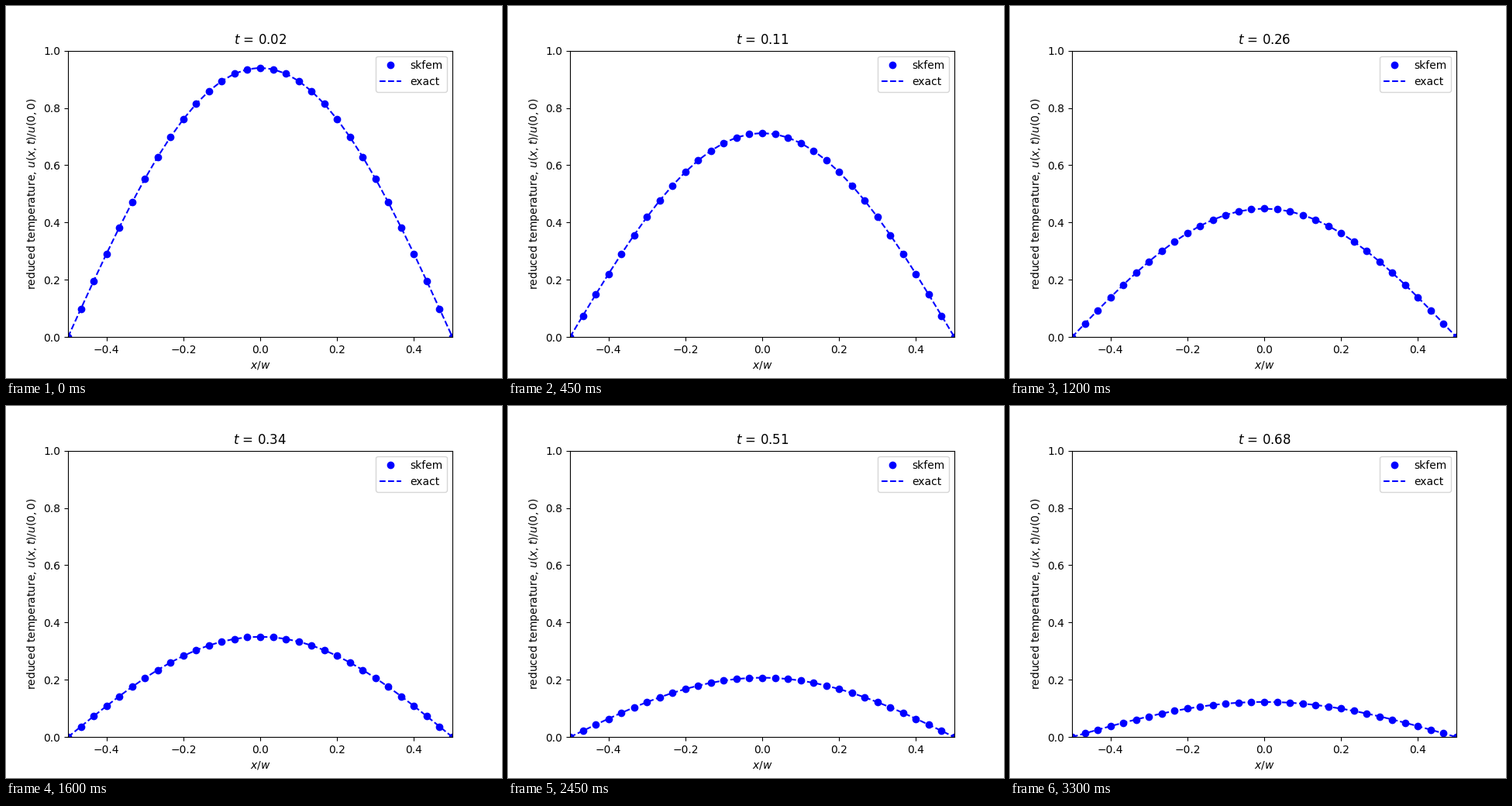
A matplotlib script that plays this animation: 640 by 480 pixels, repeating every 3.35 s.

```python
import numpy as np
import matplotlib.pyplot as plt
from matplotlib.animation import FuncAnimation

FRAMES, INTERVAL = 67, 50
DT = 0.01
DIFFUSIVITY, HALF_WIDTH = 5.0, 2.0
RATE = DIFFUSIVITY * (np.pi / (2 * HALF_WIDTH)) ** 2

x = np.linspace(-0.5, 0.5, 31)


def temperature(t):
    return np.exp(-RATE * t) * np.cos(np.pi * x)


fig, ax = plt.subplots(figsize=(6.4, 4.8), dpi=100)
markers, = ax.plot(x, temperature(0), "o", color="blue", label="skfem")
curve, = ax.plot(x, temperature(0), "--", color="blue", label="exact")
ax.set_xlim(-0.5, 0.5)
ax.set_ylim(0, 1)
ax.set_xlabel("$x/w$")
ax.set_ylabel("reduced temperature, $u(x, t)/u(0, 0)$")
ax.legend(loc="upper right")
title = ax.set_title("")


def update(i):
    t = (i + 2) * DT
    u = temperature(t)
    markers.set_ydata(u)
    curve.set_ydata(u)
    title.set_text(f"$t$ = {t:.2f}")
    return markers, curve, title


anim = FuncAnimation(fig, update, frames=FRAMES, interval=INTERVAL,
                     repeat=True, repeat_delay=0, blit=False)
plt.show()
```
